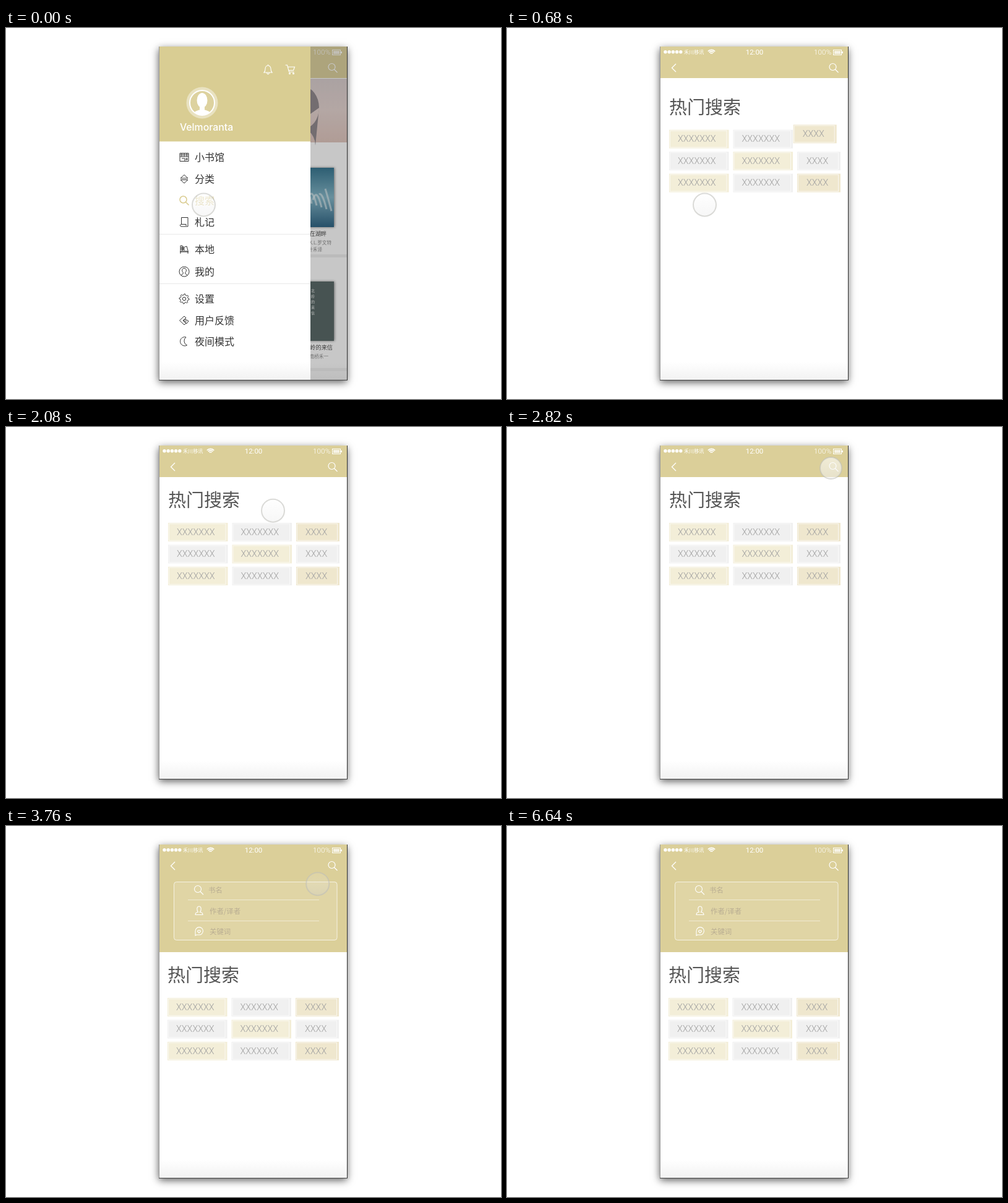
Animation of 800x600 px, one loop 7620 ms. Source, as an HTML page with a canvas:

```html
<!DOCTYPE html>
<html lang="zh">
<head>
<meta charset="utf-8">
<style>
html, body { margin: 0; width: 100%; height: 100%; overflow: hidden; background: #fff; }
canvas { display: block; }
</style>
</head>
<body>
<canvas id="stage" width="800" height="600"></canvas>
<script>
const ctx = document.getElementById('stage').getContext('2d');
const LOOP = 7620;
const GOLD = '#dbcf99';
const CJK = '"Noto Sans CJK SC", "Noto Sans", sans-serif';
const LATIN = 'Roboto, sans-serif';

const clamp = v => Math.max(0, Math.min(1, v));
const mix = (a, b, p) => a + (b - a) * p;
const span = (t, a, b) => clamp((t - a) / (b - a));
const easeOut = (p, power = 2) => 1 - (1 - p) ** power;
const easeInOut = p => p < .5 ? 4 * p ** 3 : 1 - 4 * (1 - p) ** 3;

function text(str, x, y, size, color, { family = CJK, weight = 400, align = 'left' } = {}) {
  ctx.font = `${weight} ${size}px ${family}`;
  ctx.textAlign = align;
  ctx.textBaseline = 'middle';
  ctx.fillStyle = color;
  ctx.fillText(str, x, y);
}

function rect(x, y, w, h, color) {
  ctx.fillStyle = color;
  ctx.fillRect(x, y, w, h);
}

function disc(x, y, r, color) {
  ctx.fillStyle = color;
  ctx.beginPath();
  ctx.arc(x, y, r, 0, 7);
  ctx.fill();
}

function ring(x, y, r, color, width = 1) {
  ctx.strokeStyle = color;
  ctx.lineWidth = width;
  ctx.beginPath();
  ctx.arc(x, y, r, 0, 7);
  ctx.stroke();
}

function gradient(x0, y0, x1, y1, ...colors) {
  const g = ctx.createLinearGradient(x0, y0, x1, y1);
  colors.forEach((c, i) => g.addColorStop(i / (colors.length - 1), c));
  return g;
}

function layer(alpha, draw) {
  if (alpha <= 0) return;
  ctx.save();
  ctx.globalAlpha *= alpha;
  draw();
  ctx.restore();
}

// Line icons, drawn around their own centre.
const ICONS = {
  search: 'M4 -1.5A5.5 5.5 0 1 1 -7 -1.5A5.5 5.5 0 1 1 4 -1.5M2.5 2.5L7.5 7.5',
  back: 'M3 -6.5L-3.5 0L3 6.5',
  bell: 'M-6.5 5Q-4.5 3 -4.5 -1C-4.5 -8 4.5 -8 4.5 -1Q4.5 3 6.5 5ZM-2 5.5Q0 10 2 5.5M0 -6V-8',
  cart: 'M-8 -7H-5L-2 4H6M-4 -4H7L5 1.5H-2.7M0 6.5A1 1 0 1 1 -2 6.5A1 1 0 1 1 0 6.5M6 6.5A1 1 0 1 1 4 6.5A1 1 0 1 1 6 6.5',
  shop: 'M-7 -6.5H7V6.5H-7ZM-7 -4H7M-7 -1H7M-4 -6V-1M0 -6V-1M4 -6V-1M-4 2H1V6M3 2H5V4H3Z',
  sort: 'M-6 -1L0 -6.5L6 -1ZM-6 1.5L0 7L6 1.5Z',
  note: 'M-4.5 4V-7.5H6V7H-5.5Q-8 5 -5.5 3.5H3V6',
  shelf: 'M-7 3H7M-6 3V7M6 3V7M-6 2V-6H-3V2M-3 2V-4H0V2M1 -4L4 -5L6 2M-5 -4V1M-1.5 -3V1M-7 4H7',
  user: 'M8 0A8 8 0 1 1 -8 0A8 8 0 1 1 8 0M-5 5.5Q-1.5 4 -1.5 2C-5 -2 -3 -5.5 0 -5.5S5 -2 1.5 2Q1.5 4 5 5.5',
  feedback: 'M-7.5 0L0 -7L3 -4L-2 0L3 4.5L0 7ZM2 -2L-1 0.5L4 5L7 1ZM1 1H4',
  moon: 'M3 -7A7.2 7.2 0 1 0 4.5 6A7.5 7.5 0 0 1 3 -7',
  person: 'M-1.5 2.5C-4 -1 -4 -7 0 -7S4 -1 1.5 2.5Q6 2.5 6 6.5H-6Q-6 2.5 -1.5 2.5',
  bubble: 'M-6 7V0A6.2 6.2 0 1 1 0 6H-4ZM0 3L-2.5 0.5Q-2 -2.5 0 -1Q2 -2.5 2.5 0.5Z',
};
ICONS.gear = Array.from({ length: 32 }, (_, i) => {
  const r = i % 4 < 2 ? 8 : 6, a = i * Math.PI / 16;
  return `${i ? 'L' : 'M'}${r * Math.cos(a)} ${r * Math.sin(a)}`;
}).join('') + 'ZM2.7 0A2.7 2.7 0 1 1 -2.7 0A2.7 2.7 0 1 1 2.7 0';
const paths = Object.fromEntries(Object.entries(ICONS).map(([k, d]) => [k, new Path2D(d)]));

function icon(name, x, y, color = '#fff', width = 1.1) {
  ctx.save();
  ctx.translate(x, y);
  ctx.strokeStyle = color;
  ctx.lineWidth = width;
  ctx.stroke(paths[name]);
  ctx.restore();
}

function drawFrame() {
  ctx.save();
  ctx.shadowColor = 'rgba(0,0,0,.65)';
  ctx.shadowBlur = 12;
  ctx.shadowOffsetY = 4;
  rect(247, 30, 304, 539, '#fff');
  ctx.restore();
}

function drawEdges() {
  rect(551, 30, 1, 540, '#333');
  rect(247, 569, 305, 1, '#444');
  rect(247, 30, 1, 539, 'rgba(70,70,70,.55)');
}

function drawBlank() {
  rect(248, 30, 303, 539, '#fff');
  rect(248, 540, 303, 29, gradient(0, 540, 0, 569, '#fff', '#f2f2f2'));
}

function drawStatus() {
  for (let i = 0; i < 5; i++) disc(256 + i * 6.2, 38.7, 2.7, '#fff');
  text('禾川移讯', 286, 39, 8.1, '#fff');
  for (let r = 2.5; r < 10; r += 2.6) {
    ctx.strokeStyle = '#fff';
    ctx.lineWidth = 1.7;
    ctx.beginPath();
    ctx.arc(330.5, 43, r, -2.4, -.74);
    ctx.stroke();
  }
  text('12:00', 400, 39.5, 11.5, '#fff', { family: LATIN, align: 'center' });
  text('100%', 496, 39.5, 11.8, '#fff', { family: LATIN, weight: 300 });
  ctx.strokeStyle = '#fff';
  ctx.lineWidth = 1;
  ctx.strokeRect(527.5, 35.5, 13, 8);
  rect(529, 37, 10, 5, 'rgba(255,255,255,.75)');
  rect(541, 38, 2, 3, '#fff');
}

function drawHeader(bottom) {
  rect(248, 30, 303, bottom - 30, GOLD);
  drawStatus();
  icon('search', 528, 64.5, '#fff', 1.2);
}

function drawBook(cx, top, title, by, dark) {
  const x = cx - 30;
  ctx.save();
  ctx.shadowColor = 'rgba(0,0,0,.5)';
  ctx.shadowBlur = 4;
  ctx.shadowOffsetX = 1;
  rect(x, top, 60, 96, dark ? '#526361' : gradient(x, top, x, top + 96, '#2f718d', '#7fb4c6', '#265e80'));
  ctx.restore();
  if (dark) {
    [...title].forEach((c, i) => text(c, cx - 4, top + 15 + i * 9, 6, '#eee', { align: 'center' }));
  } else {
    ctx.strokeStyle = 'rgba(230,240,242,.6)';
    ctx.lineWidth = 3;
    for (let i = 0; i < 5; i++) {
      ctx.beginPath();
      ctx.moveTo(x + 6 + i * 10, top + 70 - i * 9);
      ctx.quadraticCurveTo(x + 14 + i * 9, top + 15 + i * 8, x + 24 + i * 8, top + 58 + i * 3);
      ctx.stroke();
    }
  }
  text(title, cx + (dark ? 28 : 18), top + 107, 9.2, '#444', { align: 'right' });
  by.forEach((s, i) => text(s, cx + [dark ? 21 : 26, 11][i], top + 121 + i * 11, 7.6, '#888', { align: 'right' }));
}

function drawHome() {
  drawBlank();
  rect(248, 82, 303, 103, gradient(0, 82, 0, 185, '#d8cdcd', '#e5d3cf', '#e0c5bc'));
  ctx.fillStyle = '#8d8589';
  ctx.beginPath();
  ctx.ellipse(480, 129, 26, 34, 0, 0, 7);
  ctx.ellipse(460, 190, 40, 35, 0, Math.PI, 0);
  ctx.fill();
  for (const cx of [300, 400, 500]) {
    drawBook(cx, 226, '雨停在湖畔', ['K.L.罗文特', '叶禾译'], false);
    drawBook(cx, 410, '北岭的来信', ['南桥禾一'], true);
  }
  rect(248, 366, 303, 5, '#eee');
  rect(248, 550, 303, 5, '#eee');
  drawHeader(81);
}

const MENU = [
  ['shop', '小书馆', 209], ['sort', '分类', 244], ['search', '搜索', 279], ['note', '札记', 314],
  ['shelf', '本地', 358], ['user', '我的', 394],
  ['gear', '设置', 438], ['feedback', '用户反馈', 473], ['moon', '夜间模式', 507],
];

function drawDrawer(dx) {
  ctx.save();
  ctx.translate(dx, 0);
  rect(248, 30, 244, 539, '#fff');
  rect(248, 540, 244, 29, gradient(0, 540, 0, 569, '#fff', '#f2f2f2'));
  rect(248, 30, 244, 153.5, '#d9cd93');
  icon('bell', 423.5, 67);
  icon('cart', 459.5, 67);
  disc(317, 121, 25.5, 'rgba(255,255,255,.42)');
  disc(317, 121, 20, '#ddd29f');
  ctx.save();
  ctx.beginPath();
  ctx.arc(317, 121, 20, 0, 7);
  ctx.clip();
  ctx.fillStyle = '#fff';
  ctx.beginPath();
  ctx.ellipse(317, 117, 8.5, 12, 0, 0, 7);
  ctx.fill();
  rect(313, 124, 8, 9, '#fff');
  ctx.beginPath();
  ctx.ellipse(317, 141, 15, 9, 0, 0, 7);
  ctx.fill();
  ctx.restore();
  ring(317, 121, 20, '#fff', 2);
  text('Velmoranta', 281, 161.5, 15.8, '#fff', { family: 'Inter, sans-serif', weight: 500 });
  for (const [name, label, y] of MENU) {
    const color = name === 'search' ? '#d9cb8e' : '#333';
    icon(name, 288, y, color, name === 'search' ? 1.5 : 1);
    text(label, 305, y, 16, color, { weight: 300 });
  }
  rect(248, 333, 244, 1, '#e9e9e9');
  rect(248, 413, 244, 1, '#e9e9e9');
  ctx.restore();
}

const COLUMNS = [[262, 96.5], [365.5, 96.5], [469, 70]];
const TINTS = ['#f3eed8', '#f0f0f0', '#efe7ce'];

function drawTag(index, dx, dy) {
  const col = index % 3, row = Math.floor(index / 3);
  const [x0, w] = COLUMNS[col];
  const x = x0 + dx, y = 155 + row * 35.5 + dy;
  const tint = row === 1 ? [1, 0, 1][col] : col;
  rect(x, y, w, 30, TINTS[tint]);
  ctx.strokeStyle = 'rgba(255,255,255,.65)';
  ctx.lineWidth = 1;
  ctx.strokeRect(x + 1.5, y + 1.5, w - 5, 27);
  text(col === 2 ? 'XXXX' : 'XXXXXXX', x + (col === 2 ? 15 : 14), y + 15.5, 14.4, '#a0a0a0',
    { family: LATIN, weight: 300 });
}

// Each tag breaks away from the sliding group and hops to rest on its own.
const HOP = 40;
const ENTRY_ORDER = [2, 1, 0, 5, 4, 3, 8, 7, 6];
const OPEN_ORDER = [0, 8, 7, 6, 5, 4, 3, 2, 1];

function entryStart(i) {
  const k = ENTRY_ORDER.indexOf(i);
  return k ? 680 + 5 * k : 668;
}
const openStart = i => 3008 + 28 * OPEN_ORDER.indexOf(i);

function drawSearchPage(t) {
  const opening = t > 2800;
  const open = easeOut(span(t, 2860, 3280), 2.25);
  const rise = 200 * (1 - easeOut(span(t, 400, 760)));
  const slide = 123 * open;

  drawBlank();
  layer(span(t, 380, 520), () => {
    text('热门搜索', 262 - open, 118 + rise + slide, 29, '#555', { weight: 300 });
    for (let i = 0; i < 9; i++) {
      const p = span(t, ...(s => [s, s + HOP])(opening ? openStart(i) : entryStart(i)));
      const arc = Math.sin(Math.PI * p);
      const y = opening ? mix(slide, 123, p) - 9 * arc : rise * (1 - p) - 6 * arc;
      drawTag(i, -7.4 * arc - open, y);
    }
  });
  drawHeader(81 + slide);
  icon('back', 270, 64.5, '#fff', 1.3);
  if (open > 0) drawFields(81 + slide, span(t, 2900, 3100));
}

const FIELDS = [
  ['search', '书名', 311.5, 327, 103.5],
  ['person', '作者/译者', 312, 329, 137],
  ['bubble', '关键词', 312, 329, 170],
];

function drawFields(bottom, alpha) {
  layer(alpha, () => {
    ctx.beginPath();
    ctx.rect(248, 81, 303, bottom - 81);
    ctx.clip();
    ctx.beginPath();
    ctx.roundRect(271.5, 90.5, 263.5, 94, 4);
    ctx.fillStyle = 'rgba(240,232,200,.25)';
    ctx.fill();
    ctx.strokeStyle = 'rgba(255,255,255,.7)';
    ctx.lineWidth = 1;
    ctx.stroke();
    rect(294, 119, 212, 1, 'rgba(255,255,255,.5)');
    rect(294, 153, 212, 1, 'rgba(255,255,255,.5)');
    for (const [name, label, ix, tx, y] of FIELDS) {
      icon(name, ix, y, '#fff', 1.1);
      text(label, tx, y + .5, 11.4, '#b9ad92', { weight: 300 });
    }
  });
}

// Finger moves: start, end, from, to, easing.
const MOVES = [
  [1100, 1780, [319.5, 286], [417, 146], easeOut],
  [1880, 2500, [417, 146], [523.5, 66.5], easeInOut],
  [3440, 3880, [523.5, 66.5], [502, 96], easeInOut],
  [4020, 4200, [502, 96], [524, 70], easeInOut],
];

function drawTouch(t) {
  let [x, y] = MOVES[0][2];
  for (const [a, b, from, to, ease] of MOVES) {
    if (t < a) break;
    const p = ease(span(t, a, b));
    x = mix(from[0], to[0], p);
    y = mix(from[1], to[1], p);
  }
  const press = span(t, 2720, 2800) - span(t, 2860, 2960);
  const dim = span(t, 2860, 3000);
  layer(1 - span(t, 6570, 6640), () => {
    const r = 18.5 - press;
    disc(x, y, r, gradient(0, y - r, 0, y + r,
      `rgba(255,255,255,${mix(.6, .1, dim)})`,
      `rgba(${mix(240, 205, dim)},${mix(240, 205, dim)},${mix(240, 200, dim)},${mix(.55, .35, dim)})`));
    ring(x, y, r, 'rgba(190,190,185,.55)', 2);
  });
}

function render(t) {
  ctx.clearRect(0, 0, 800, 600);
  drawFrame();
  ctx.save();
  ctx.beginPath();
  ctx.rect(248, 30, 303, 539);
  ctx.clip();
  const close = easeInOut(span(t, 30, 420));
  if (close < 1) drawHome();
  layer(span(t, 120, 400), () => drawSearchPage(t));
  if (close < 1) {
    rect(248, 30, 303, 539, `rgba(40,40,40,${.26 * (1 - close)})`);
    drawDrawer(-246 * close);
  }
  drawTouch(t);
  ctx.restore();
  drawEdges();
}

const began = performance.now();
function tick() {
  render((performance.now() - began) % LOOP);
  requestAnimationFrame(tick);
}
tick();
</script>
</body>
</html>
```
